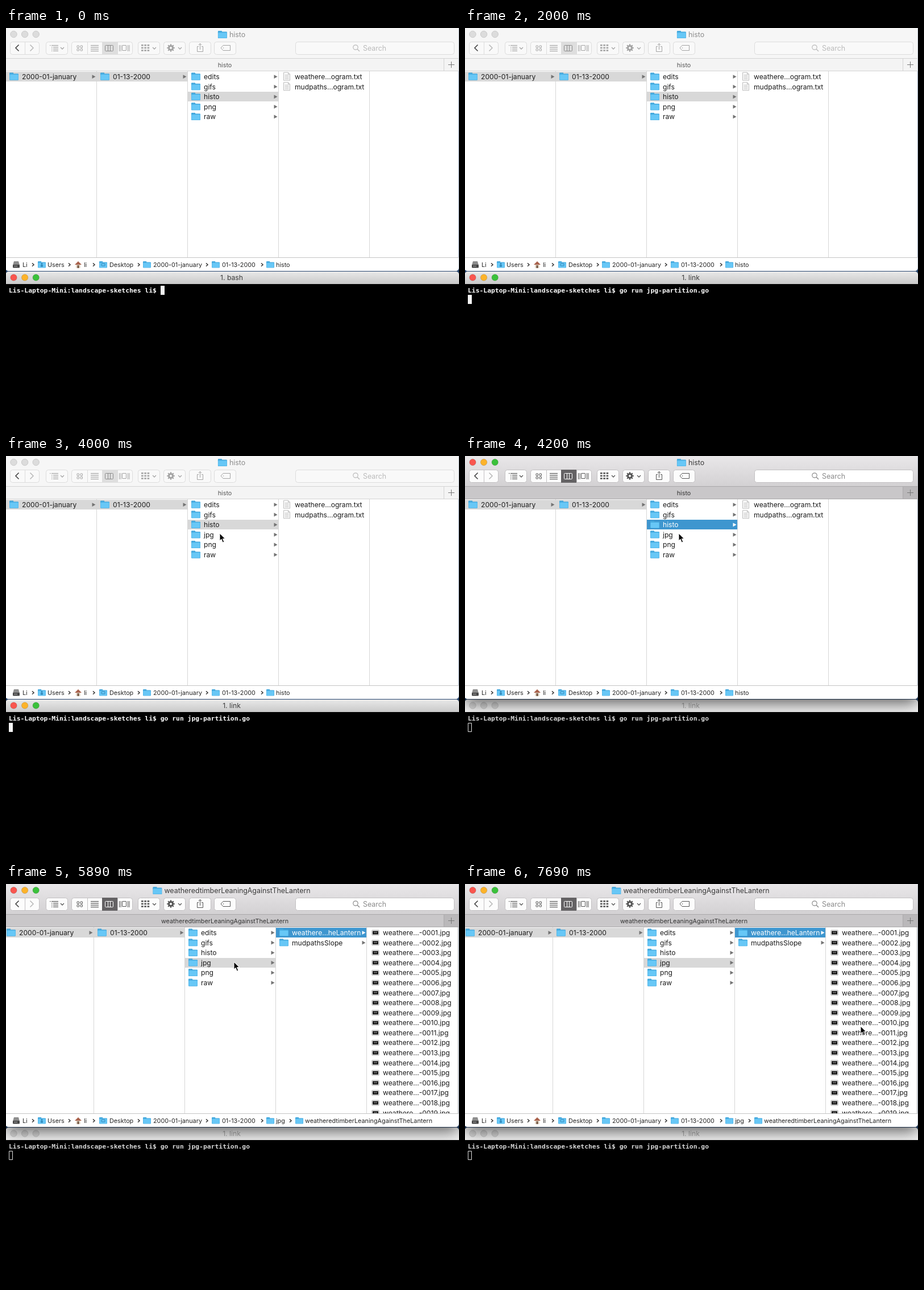
These frames come from a looping animation (797 by 703 pixels, 7790 ms). An HTML page with a canvas:

```html
<!DOCTYPE html>
<html lang="en">
<head>
<meta charset="utf-8">
<title>File browser and terminal</title>
<style>
  html, body { margin: 0; width: 100%; height: 100%; overflow: hidden; background: #000; }
  canvas { display: block; }
</style>
</head>
<body>
<canvas id="stage" width="797" height="703"></canvas>
<script>
const c = document.getElementById('stage').getContext('2d');
const LOOP = 7790, ROW = 17.59, CHAR = 6.84;
const UI = 'Inter, "Open Sans", sans-serif';
const MONO = '"DejaVu Sans Mono", "Liberation Mono", monospace';
const PROMPT = 'Lis-Laptop-Mini:landscape-sketches li$ ';
const COMMAND = 'go run jpg-partition.go ';
const LONG_NAME = 'weatheredtimberLeaningAgainstTheLantern';
const LIGHTS = ['#f9564f', '#fdb32a', '#3bc13b'];

// Pointer positions, each held until the next: time, x, y
const POINTER = [
  [3300, 440, 534], [3400, 548, 505], [3500, 655, 430], [3600, 712, 340],
  [3700, 640, 240], [3800, 510, 172], [3900, 367, 140], [4000, 376, 136],
  [4400, 393, 137], [4500, 401, 137],
  [6190, 412, 146], [6290, 436, 168], [6390, 460, 193], [6490, 472, 206],
  [7190, 530, 219], [7290, 640, 239], [7390, 694, 248], [7590, 695, 249], [7690, 696, 250]
];

const clamp = (v, lo, hi) => Math.min(hi, Math.max(lo, v));

function rect(x, y, w, h, color) {
  c.fillStyle = color;
  c.fillRect(x, y, w, h);
}

function box(x, y, w, h, r, fill, stroke) {
  c.beginPath();
  c.roundRect(x, y, w, h, r);
  if (fill) { c.fillStyle = fill; c.fill(); }
  if (stroke) { c.strokeStyle = stroke; c.lineWidth = 1; c.stroke(); }
}

function path(points, fill, stroke, width = 1) {
  c.beginPath();
  for (let i = 0; i < points.length; i += 2) c.lineTo(points[i], points[i + 1]);
  if (fill) { c.closePath(); c.fillStyle = fill; c.fill(); }
  if (stroke) { c.strokeStyle = stroke; c.lineWidth = width; c.stroke(); }
}

function circle(x, y, r, fill, stroke, width = 1) {
  c.beginPath();
  c.arc(x, y, r, 0, 7);
  if (fill) { c.fillStyle = fill; c.fill(); }
  if (stroke) { c.strokeStyle = stroke; c.lineWidth = width; c.stroke(); }
}

function text(s, x, y, size, color, align = 'left') {
  c.font = `${size}px ${UI}`;
  c.textAlign = align;
  c.fillStyle = color;
  c.fillText(s, x, y);
}

function vertical(y0, y1, from, to) {
  const g = c.createLinearGradient(0, y0, 0, y1);
  g.addColorStop(0, from);
  g.addColorStop(1, to);
  return g;
}

const chevron = (x, y, dx, dy, color, w = 1.3) =>
  path(dx ? [x - dx, y - dy, x, y, x - dx, y + dy] : [x - 3, y - dy, x, y, x + 3, y - dy], null, color, w);

function lights(y, active) {
  LIGHTS.forEach((color, i) =>
    circle(13.5 + 19.6 * i, y, 5.7, active ? color : '#dcdcdc', active ? 'rgba(0,0,0,.15)' : '#cacaca'));
}

function folder(x, y, s = 16) {
  box(x, y, s * .45, s * .3, 1, '#43a7dc');
  box(x, y + s * .1, s, s * .72, 1.2, '#46abe0');
  box(x + .5, y + s * .2, s - 1, s * .58, 1, '#67c7f6');
}

function documentIcon(x, y) {
  path([x, y, x + 8, y, x + 11, y + 3, x + 11, y + 14, x, y + 14, x, y], '#fbfbfb', '#bdbdbd');
  path([x + 8, y, x + 8, y + 3, x + 11, y + 3], null, '#bdbdbd');
  for (let i = 0; i < 4; i++) rect(x + 2, y + 4 + i * 2.3, 7, 1, '#c4c4c4');
}

function thumbnail(x, y) {
  box(x + .5, y + .5, 13, 9, 1.5, '#f2f2f2', '#b5b5b5');
  rect(x + 2, y + 2, 10, 6, '#181818');
  rect(x + 4, y + 4, 6, 1.5, '#777');
}

function toolbar(active) {
  const ink = active ? '#555' : '#a4a4a4';
  const edge = active ? '#c2c0c2' : '#dcdcdc';
  const face = active ? '#fcfcfc' : '#f9f9f9';
  const button = (x, w) => box(x + .5, 24.5, w, 22, 4, face, edge);
  [[7, 51], [70, 38], [115, 107], [232, 38], [277, 38], [322, 38], [366, 38]].forEach(b => button(...b));
  box(509.5, 24.5, 279, 22, 4, active ? '#fff' : '#f9f9f9', edge);

  rect(33, 25, 1, 21, edge);
  path([22.5, 29.5, 17, 35, 22.5, 40.5], null, '#444', 1.6);
  path([42.5, 29.5, 48, 35, 42.5, 40.5], null, '#b8b8b8', 1.5);

  for (let i = 0; i < 4; i++) {
    const indent = i ? 3 : 0;
    rect(77 + indent, 30 + i * 3.2, 1.5, 1.2, ink);
    rect(80 + indent, 30 + i * 3.2, 12 - indent, 1.2, ink);
    rect(149, 30 + i * 3.3, 14, 1.2, ink);
    box(125 + (i % 2) * 6, 31 + (i >> 1) * 5.5, 3.5, 3.5, .5, null, ink);
  }
  [99, 261, 306].forEach(x => chevron(x, 37, 0, 3, ink));

  rect(143, 25, 1, 21, edge);
  rect(196, 25, 1, 21, edge);
  rect(169, 24, 27, 23, active ? '#646264' : '#dedede');
  const columns = active ? '#fff' : '#8c8c8c';
  box(174.5, 30.5, 14, 10, 1, null, columns);
  rect(179, 31, 1, 9, columns);
  rect(183, 31, 1, 9, columns);

  box(204.5, 30.5, 7, 9, .5, null, ink);
  [199, 201.5, 214, 216.5].forEach(x => rect(x, 30, 1, 11, ink));

  for (let i = 0; i < 9; i++) {
    const x = 238 + (i % 3) * 5.3, y = 29 + Math.floor(i / 3) * 4.6;
    rect(x, y, 3.6, 2.6, ink);
  }

  for (let i = 0; i < 8; i++) {
    const a = i * Math.PI / 4, dx = Math.cos(a), dy = Math.sin(a);
    path([290 + 4 * dx, 35 + 4 * dy, 290 + 6.8 * dx, 35 + 6.8 * dy], null, ink, 2.2);
  }
  circle(290, 35, 3.5, null, ink, 3);

  path([339, 32.5, 336.5, 32.5, 336.5, 41.5, 346.5, 41.5, 346.5, 32.5, 344, 32.5], null, ink);
  path([341.5, 38, 341.5, 27.5], null, ink);
  path([338.7, 30, 341.5, 27.2, 344.3, 30], null, ink);

  path([378, 35, 382, 30.5, 394.5, 30.5, 394.5, 39.5, 382, 39.5, 378, 35], null, ink);
  circle(382.5, 35, .8, ink);

  const hint = active ? '#8b8b8b' : '#bbb';
  circle(615, 34, 4.2, null, hint, 1.2);
  path([618, 37, 622, 41], null, hint, 1.4);
  text('Search', 628, 39.6, 12.4, hint);
}

// rows: [name, row position, opacity]
function column(x, rows, kind, selected, focused) {
  for (const [name, at, alpha = 1] of rows) {
    const y = 77 + ROW * at, mid = y + 8.6;
    const chosen = name === selected, lit = chosen && focused;
    if (chosen) rect(x, Math.round(y), 159, 17, lit ? '#3e96cf' : '#d8d8d8');
    c.globalAlpha = alpha;
    if (kind === 'folder') {
      folder(x + 6, mid - 7);
      path([x + 151.5, mid - 3.4, x + 157.5, mid, x + 151.5, mid + 3.4], lit ? '#fff' : '#747474');
    } else if (kind === 'text') documentIcon(x + 8.5, mid - 7.5);
    else thumbnail(x + 8, mid - 5);
    text(name, x + 28, mid + 4.4, 12.1, lit ? '#fff' : '#1c1c1c');
    c.globalAlpha = 1;
  }
  rect(x + 159, 76, 1, 327, '#d6d6d6');
}

const list = names => names.map((name, i) => [name, i]);

function columns(t, focused) {
  const opened = t >= 5890, jpgChosen = t >= 4690;
  const shift = opened ? -5 : 0;
  const grow = clamp(Math.floor((t - 2000) / 100) / 3, 0, 1);
  const folders = list(['edits', 'gifs', 'histo']);
  if (grow > 0) folders.push(['jpg', 3, grow]);
  folders.push(['png', 3 + grow], ['raw', 4 + grow]);

  column(shift, [['2000-01-january', 0]], 'folder', '2000-01-january');
  column(160 + shift, [['01-13-2000', 0]], 'folder', '01-13-2000');
  column(320 + shift, folders, 'folder', jpgChosen ? 'jpg' : 'histo', focused && !opened);
  if (!jpgChosen) column(480, list(['weathere...ogram.txt', 'mudpaths...ogram.txt']), 'text');
  else {
    const inner = t >= 4790 ? list(['weathere...heLantern', 'mudpathsSlope']) : [];
    column(480 + shift, inner, 'folder', opened && inner[0][0], true);
  }
  if (opened) {
    const shots = Array.from({ length: 19 }, (_, i) => `weathere...-${String(i + 1).padStart(4, '0')}.jpg`);
    column(635, list(shots), 'image');
  }
}

function pathBar(t) {
  rect(0, 403, 797, 25, '#fff');
  rect(0, 403, 797, 1, '#c4c4c4');
  const crumbs = [['Li', 12, 29], ['Users', 56, 73], ['li', 121, 137], ['Desktop', 164, 182],
    ['2000-01-january', 241, 259], ['01-13-2000', 362, 380], [t < 4790 ? 'histo' : 'jpg', 458, 475]];
  if (t >= 5890) crumbs.push([LONG_NAME, 509, 526]);
  crumbs.forEach(([name, x, tx], i) => {
    if (i === 0) {
      path([x + 2, 410, x + 10, 410, x + 12, 417, x, 417], '#8d8d8d');
      box(x, 416, 12, 5.5, 1, '#454545');
      rect(x + 2, 418, 6, 1, '#aaa');
    } else if (i === 2) {
      rect(x + 2, 415, 8, 7, '#e6ddd0');
      path([x, 416, x + 6, 410, x + 12, 416], '#a9624c');
      rect(x + 4.5, 417, 3, 5, '#71543f');
    } else {
      folder(x, 410, 14);
      if (i === 1) { circle(x + 7, 414.5, 1.5, '#2f86b8'); rect(x + 5, 416.5, 4, 3, '#2f86b8'); }
      if (i === 3) box(x + 4, 414, 6, 4, .5, null, '#2f86b8');
    }
    text(name, tx, 420, 10.8, '#262626');
    if (i) chevron([0, 49, 113, 156, 235, 355, 452, 502][i], 416, 3, 2.7, '#333', 1.5);
  });
}

function browser(t, active) {
  c.save();
  if (active) {
    c.shadowColor = 'rgba(0,0,0,.62)';
    c.shadowBlur = 28;
    c.shadowOffsetY = 8;
  }
  box(-.5, -6, 797, 433, 5, '#fff');
  c.shadowColor = 'transparent';
  c.clip();

  rect(0, 0, 797, 53, active ? vertical(0, 53, '#e9e7e9', '#d3d1d3') : '#f6f6f6');
  rect(0, 53, 797, 23, active ? '#c9c7c9' : '#f4f4f4');
  if (active) rect(770, 53, 27, 23, '#bab8ba');
  const seam = active ? '#aaa8aa' : '#d4d4d4';
  rect(0, 53, 797, 1, seam);
  rect(0, 75, 797, 1, seam);
  rect(770, 53, 1, 23, seam);
  rect(778, 64, 11, 1, '#777');
  rect(783, 59, 1, 11, '#777');
  lights(11, active);
  toolbar(active);

  const title = t < 4790 ? 'histo' : t < 5890 ? 'jpg' : LONG_NAME;
  c.font = `12.4px ${UI}`;
  const left = 397 - (c.measureText(title).width + 20) / 2;
  folder(left, 5);
  text(title, left + 20, 15.5, 12.4, active ? '#3a3a3a' : '#8c8c8c');
  text(title, 385, 68.5, 10.8, active ? '#333' : '#555', 'center');

  columns(t, active);
  pathBar(t);
  c.restore();
}

function terminal(t, active) {
  c.save();
  box(-.5, 428, 797.5, 290, 5, '#000');
  c.clip();
  rect(0, 428, 797, 22, active ? vertical(428, 450, '#e9e9e9', '#c9c9c9') : '#f5f5f5');
  lights(438.5, active);
  text(t < 2000 ? '1. bash' : '1. link', 397, 443, 12.2, active ? '#3c3c3c' : '#aaa', 'center');

  const typed = t >= 1200 ? COMMAND.length : clamp(Math.floor((t - 200) / 98.5), 0, 8);
  c.font = `bold 11.36px ${MONO}`;
  c.textAlign = 'left';
  c.fillStyle = active ? '#fff' : '#dcdcdc';
  c.fillText(PROMPT + COMMAND.slice(0, typed), 5, 465);

  const entered = t >= 1500;
  const x = entered ? 5 : Math.round(5 + (PROMPT.length + typed) * CHAR);
  const y = entered ? 469 : 453;
  if (active) rect(x, y, 7, 16, '#f4f4f4');
  else box(x + .5, y + .5, 6, 15, 0, null, '#e0e0e0');
  c.restore();
}

function pointer(t) {
  const spot = POINTER.findLast(p => p[0] <= t);
  if (!spot) return;
  const [, x, y] = spot;
  if (y > 450) {
    path([x, y - 6, x, y + 6], null, '#ddd', 1.3);
    for (const s of [-1, 1])
      path([x - 3, y + 7.5 * s, x - 1, y + 7 * s, x, y + 5.5 * s, x + 1, y + 7 * s, x + 3, y + 7.5 * s], null, '#ddd');
    return;
  }
  const arrow = [0, 0, 0, 13, 3, 10.3, 5.3, 16, 7.7, 15, 5.4, 9.6, 9.5, 9.4, 0, 0];
  path(arrow.map((v, i) => v + (i % 2 ? y : x)), '#000', '#fff', 1);
}

function draw(t) {
  rect(0, 0, 797, 703, '#27466f');
  const front = t >= 4200;
  if (front) {
    terminal(t, false);
    browser(t, true);
  } else {
    browser(t, false);
    terminal(t, true);
  }
  pointer(t);
}

function tick() {
  draw(performance.now() % LOOP);
  requestAnimationFrame(tick);
}
tick();
</script>
</body>
</html>
```
